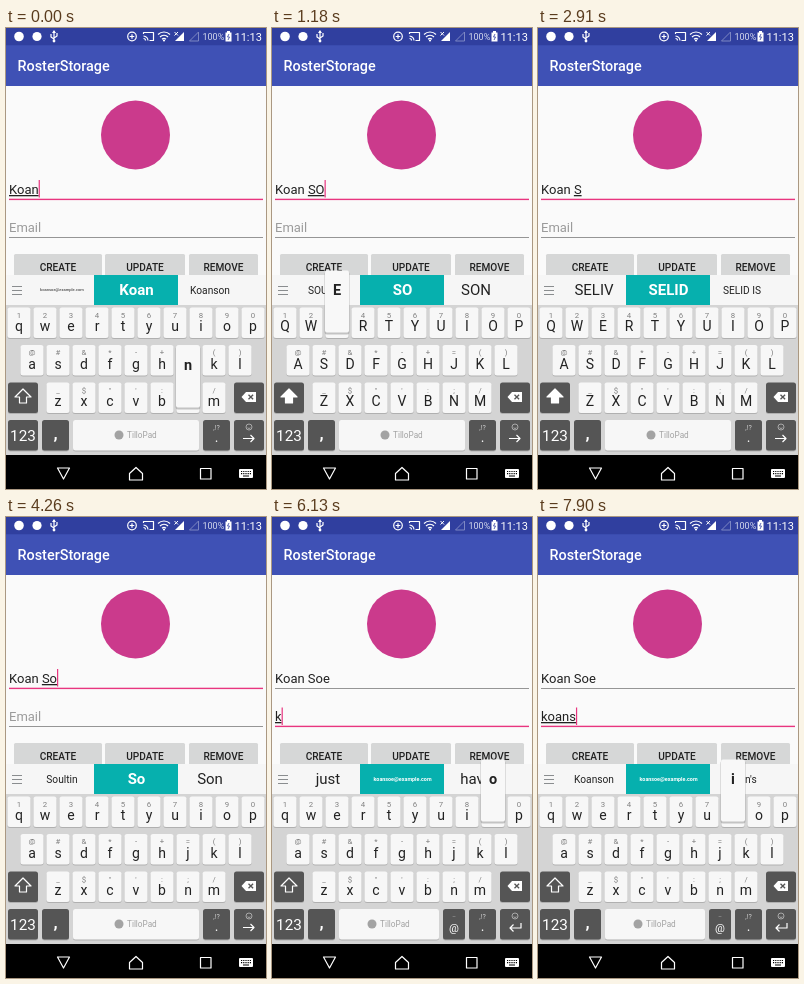
Recreate the animation shown at these times as an HTML page. Size 260x461 px, loop 8 s.

```html
<!DOCTYPE html>
<html lang="en">
<head>
<meta charset="utf-8">
<title>Typing on a phone</title>
<style>
  html, body { margin: 0; width: 100%; height: 100%; overflow: hidden; background: #fafafa; }
  svg { display: block; width: 100%; height: 100%; font-family: Roboto, sans-serif; }
  text { white-space: pre; }
  .mid { text-anchor: middle; }
  .caps .letter { text-transform: uppercase; }
  .line { fill: none; stroke: #fff; stroke-width: 1.2; stroke-linejoin: round; }
  .thin { fill: none; stroke: #ccc; stroke-width: .7; }
  .composing { text-decoration: underline; text-decoration-thickness: 1px; }
</style>
</head>
<body>
<svg id="stage" viewBox="0 0 260 461" xmlns="http://www.w3.org/2000/svg">
  <rect width="260" height="461" fill="#fafafa"/>
  <rect y="17" width="260" height="41" fill="#3f51b5"/>
  <rect width="260" height="17.3" fill="#303f9f"/>

  <g id="status" fill="#fff">
    <circle cx="13" cy="8.5" r="4.8"/>
    <circle cx="31" cy="8.5" r="4.6"/>
    <path class="line" d="M48 3v10M45 6v3l3 2M51 5v3l-3 2"/>
    <circle cx="48" cy="13" r="1.4"/>
    <path d="M46 5l2-3 2 3z"/>
    <circle class="line" cx="126" cy="8.5" r="4.3"/>
    <path class="line" d="M126 6.2v4.6M123.7 8.5h4.6"/>
    <path class="line" d="M137.5 6V4.500h10v8h-4M137.500 8a5 5 0 0 1 4.500 4.500M137.500 10.500a2 2 0 0 1 2 2"/>
    <path class="line" d="M152 6.500a8.500 8.500 0 0 1 12 0M154 9a5.500 5.500 0 0 1 8 0M156 11.200a3 3 0 0 1 4 0"/>
    <circle cx="158" cy="12.500" r="1.100"/>
    <path d="M178 4v9h-9z"/>
    <path stroke="#fff" d="M168.500 4l3.500 3.500M172 4l-3.500 3.500"/>
    <path d="M192.500 4v9h-9z" fill="none" stroke="#7d87c3"/>
    <text x="196.500" y="12" font-size="9" fill="#d4d8ec">100%</text>
    <path d="M219.500 4.500h1.500v-1.500h3v1.500h1.500v9h-6z"/>
    <path d="M223 6l-1.500 3h2l-1.500 3" fill="none" stroke="#303f9f" stroke-width=".8"/>
    <text x="228.500" y="13" font-size="11">11:13</text>
  </g>

  <text x="11.500" y="43" font-size="14.400" font-weight="500" fill="#fff">RosterStorage</text>
  <circle cx="129.500" cy="107" r="34.500" fill="#cb3a8c"/>

  <g font-size="13" fill="#212121">
    <text x="3" y="166"><tspan id="namePlain"></tspan><tspan id="nameTyped" class="composing"></tspan></text>
    <text id="hint" x="3" y="204" fill="#9b9b9b">Email</text>
    <text x="3" y="204"><tspan id="mailTyped" class="composing"></tspan></text>
  </g>
  <rect id="nameLine" x="3" width="254"/>
  <rect id="mailLine" x="3" width="254"/>
  <rect id="caret" width="1.200" height="17.500" fill="#e8357f"/>

  <g id="buttons"></g>
  <rect y="247" width="260" height="30" fill="#f6f6f6"/>
  <rect x="88" y="247" width="84" height="30" fill="#06b0ae"/>
  <path d="M6 258.500h10M6 262.500h10M6 266.500h10" stroke="#8a8d8f"/>
  <g id="words" class="mid"></g>
  <rect y="277" width="260" height="150" fill="#d4d4d4"/>
  <g id="keys"></g>

  <path id="shiftIcon" class="line" d="M17 361l8 8h-4.500v6h-7v-6h-4.500z"/>
  <path d="M235.500 369l4.500-5h10v10h-10z" fill="#fff"/>
  <path d="M242.500 366.700l4.600 4.600M247.100 366.700l-4.600 4.600" stroke="#555" stroke-width="1.300"/>
  <circle class="thin" cx="243" cy="399" r="3"/>
  <path class="thin" d="M241.500 399.800q1.500 1.500 3 0"/>
  <path id="enterIcon" class="line"/>

  <g id="popup">
    <rect x="-12.500" y="1" width="25" height="63" rx="2.500" fill="#999" opacity=".55"/>
    <rect x="-12" width="24" height="62" rx="2" fill="#f8f8f8"/>
    <text id="popupLetter" class="mid letter" y="24" font-size="14.500" font-weight="700" fill="#222"></text>
  </g>

  <rect y="427" width="260" height="34" fill="#000"/>
  <path class="line" d="M51.500 440h12l-6 11z"/>
  <path class="line" d="M123.500 452v-6.500l6.500-6 6.500 6v6.500z"/>
  <rect class="line" x="194.500" y="440.500" width="10.500" height="10.500"/>
  <rect x="233" y="441" width="14" height="9" rx="1" fill="#fff"/>
  <path d="M235 443.500h10M235 445.700h10" stroke="#000" stroke-width="1.200" stroke-dasharray="1.200 1"/>
  <path d="M237 448h6" stroke="#000"/>
</svg>

<script>
const LOOP = 8000;
const PINK = '#e8357f', DARK = '#555', LIGHT = '#f7f7f7';
const MAIL = 'koansoe@example.com';
const $ = id => document.getElementById(id);

function add(parent, tag, attrs, text = '') {
  const el = document.createElementNS('http://www.w3.org/2000/svg', tag);
  set(el, attrs);
  el.textContent = text;
  parent.append(el);
  return el;
}
function set(el, attrs) {
  for (const name in attrs) el.setAttribute(name, attrs[name]);
}
function label(parent, x, y, size, fill, text, extra = {}) {
  return add(parent, 'text', { x, y, 'font-size': size, fill, class: 'mid', ...extra }, text);
}
function key(x, y, width, fill, parent = $('keys')) {
  const box = { x, width, height: 30.5, rx: 2.5 };
  const shadow = add(parent, 'rect', { ...box, y: y + 1, fill: '#b0b0b0' });
  const face = add(parent, 'rect', { ...box, y, fill });
  return { shadow, face };
}

for (const [x, width, text] of [[8, 88, 'CREATE'], [99, 80, 'UPDATE'], [183, 69, 'REMOVE']]) {
  add($('buttons'), 'rect', { x, y: 226, width, height: 26, rx: 1.5, fill: '#d6d7d7' });
  label($('buttons'), x + width / 2, 242.7, 10.1, '#212121', text, { 'font-weight': 500 });
}

// Letter rows: first key centre, top edge, letters, long-press symbols.
const keyPlace = {};
for (const [x0, top, letters, symbols] of [
  [13, 279.5, 'qwertyuiop', '1234567890'],
  [26, 317, 'asdfghjkl', '@#&*-+=()'],
  [52, 354.5, 'zxcvbnm', '_$"\':;/']
]) {
  [...letters].forEach((letter, i) => {
    const x = x0 + 26 * i;
    keyPlace[letter] = [x, top - 37];
    key(x - 11.5, top, 23, LIGHT);
    label($('keys'), x, top + 10, 7.8, '#808080', symbols[i]);
    label($('keys'), x, top + 23.7, 14, '#222', letter, { class: 'mid letter' });
  });
}

key(2, 354.5, 30, DARK);
const backKey = key(228, 354.5, 30, DARK);
key(2, 392, 30, DARK);
label($('keys'), 17, 412.5, 15.3, '#fff', '123');
key(36, 392, 27, DARK);
label($('keys'), 49.5, 411, 17, '#fff', ',', { 'font-weight': 700 });
const spaceKey = key(67, 392, 126, LIGHT);
const brand = add($('keys'), 'g', { fill: '#a3a3a3' });
add(brand, 'circle', { cx: -17, cy: 407, r: 4.5 });
add(brand, 'text', { x: -9, y: 410, 'font-size': 8.2 }, 'TilloPad');
const atKey = add($('keys'), 'g', {});
key(171, 392, 22, DARK, atKey);
label(atKey, 182, 400, 7, '#ccc', '..');
label(atKey, 182, 415, 11, '#fff', '@');
key(197, 392, 27, DARK);
label($('keys'), 210.5, 402, 7, '#ccc', ',!?');
label($('keys'), 210.5, 414, 14, '#fff', '.');
key(228, 392, 30, DARK);

const wordSlots = [56, 130.5, 204].map((x, i) =>
  label($('words'), x, 0, 15, i === 1 ? '#fff' : '#222', '', { 'font-weight': i === 1 ? 700 : 400 }));

function wordSize(word, middle) {
  if (word.length < 6) return 15;
  if (word.length < 9) return 10.2;
  return middle ? 5.4 : 4.1;
}

const start = {
  plain: '', typed: 'Koan', mail: '', onMail: false, caret: true, caps: false,
  pop: 'n', space: false, back: false, words: [MAIL, 'Koan', 'Koanson']
};
const soWords = ['SOULTIN', 'SO', 'SON'], sWords = ['SELIV', 'SELID', 'SELID IS'];

// Each step changes part of the state from its time on.
const steps = [
  [0, {}],
  [140, { pop: '' }],
  [260, { space: true }],
  [380, { space: false, plain: 'Koan ', typed: '', caps: true, words: ['And', 'I', 'Is'] }],
  [530, { words: ['AND', 'I', 'IS'] }],
  [670, { pop: 's' }],
  [800, { pop: '', typed: 'S', words: sWords }],
  [920, { pop: 'o' }],
  [1060, { pop: '', typed: 'SO', words: soWords }],
  [1180, { pop: 'e' }],
  [1310, { typed: 'SOE' }],
  [1460, { pop: '', words: ['SOME', 'SOE', 'SOON'] }],
  [1880, { caret: false }],
  [2160, { back: true }],
  [2290, { back: false, typed: 'SO', caret: true }],
  [2440, { back: true, words: soWords }],
  [2600, { back: false, typed: 'S', words: sWords }],
  [2910, { caret: false }],
  [3340, { caret: true }],
  [3750, { caps: false, words: ['Seliv', 'Selid', 'Selid is'] }],
  [3880, { caret: false }],
  [4010, { pop: 'o' }],
  [4260, { pop: '', typed: 'So', caret: true, words: ['Soultin', 'So', 'Son'] }],
  [4390, { pop: 'e' }],
  [4530, { pop: '', typed: 'Soe', words: ['Some', 'Soe', 'Soon'] }],
  [4980, { caret: false }],
  [5100, { plain: 'Koan Soe', typed: '', onMail: true, caret: true, words: ['I', MAIL, 'The'] }],
  [5520, { caret: false }],
  [5840, { pop: 'k' }],
  [5990, { caret: true }],
  [6130, { pop: 'o', mail: 'k', words: ['just', MAIL, 'have'] }],
  [6270, { pop: '', mail: 'ko', words: ['kind', MAIL, 'know'] }],
  [6410, { pop: 'a' }],
  [6530, { mail: 'koa' }],
  [6660, { pop: '', words: ['Koanson', MAIL, "Koan's"] }],
  [6950, { caret: false }],
  [7380, { pop: 'n', caret: true }],
  [7500, { mail: 'koan' }],
  [7630, { pop: '' }],
  [7770, { pop: 's' }],
  [7900, { pop: 'i', mail: 'koans' }]
];
let last = start;
const states = steps.map(([, change]) => last = { ...last, ...change });

function underline(line, y, focused) {
  set(line, focused ? { y: y - .3, height: 1.4, fill: PINK } : { y, height: 1, fill: '#959595' });
}

function show(s) {
  $('stage').classList.toggle('caps', s.caps);
  $('namePlain').textContent = s.plain;
  $('nameTyped').textContent = s.typed;
  $('mailTyped').textContent = s.mail;
  $('hint').style.display = s.mail ? 'none' : '';
  underline($('nameLine'), 171, !s.onMail);
  underline($('mailLine'), 209, s.onMail);

  const field = (s.onMail ? $('mailTyped') : $('namePlain')).parentNode;
  const width = field.textContent ? field.getComputedTextLength() : 0;
  set($('caret'), { x: 3 + width, y: s.onMail ? 190.5 : 152 });
  $('caret').style.display = s.caret ? '' : 'none';

  s.words.forEach((word, i) => {
    const size = wordSize(word, i === 1);
    set(wordSlots[i], { 'font-size': size, y: 262 + size * .35 });
    wordSlots[i].textContent = word;
  });

  $('shiftIcon').style.fill = s.caps ? '#fff' : 'none';
  set(backKey.face, { fill: s.back ? '#858585' : DARK });
  const spaceWidth = s.onMail ? 100 : 126;
  set(spaceKey.shadow, { width: spaceWidth });
  set(spaceKey.face, { width: spaceWidth, fill: s.space ? '#c6c6c6' : LIGHT });
  set(brand, { transform: `translate(${67 + spaceWidth / 2})` });
  atKey.style.display = s.onMail ? '' : 'none';
  set($('enterIcon'), {
    d: s.onMail ? 'M249 406v5h-11M241.5 407.5l-3.5 3.5 3.5 3.5' : 'M237 410.5h11M244.5 407l3.5 3.5-3.5 3.5'
  });

  $('popup').style.display = s.pop ? '' : 'none';
  if (s.pop) {
    set($('popup'), { transform: `translate(${keyPlace[s.pop]})` });
    $('popupLetter').textContent = s.pop;
  }
}

let shown = -1;
function tick() {
  const time = performance.now() % LOOP;
  const index = steps.findLastIndex(([from]) => from <= time);
  if (index !== shown) show(states[shown = index]);
  requestAnimationFrame(tick);
}
tick();
</script>
</body>
</html>
```
